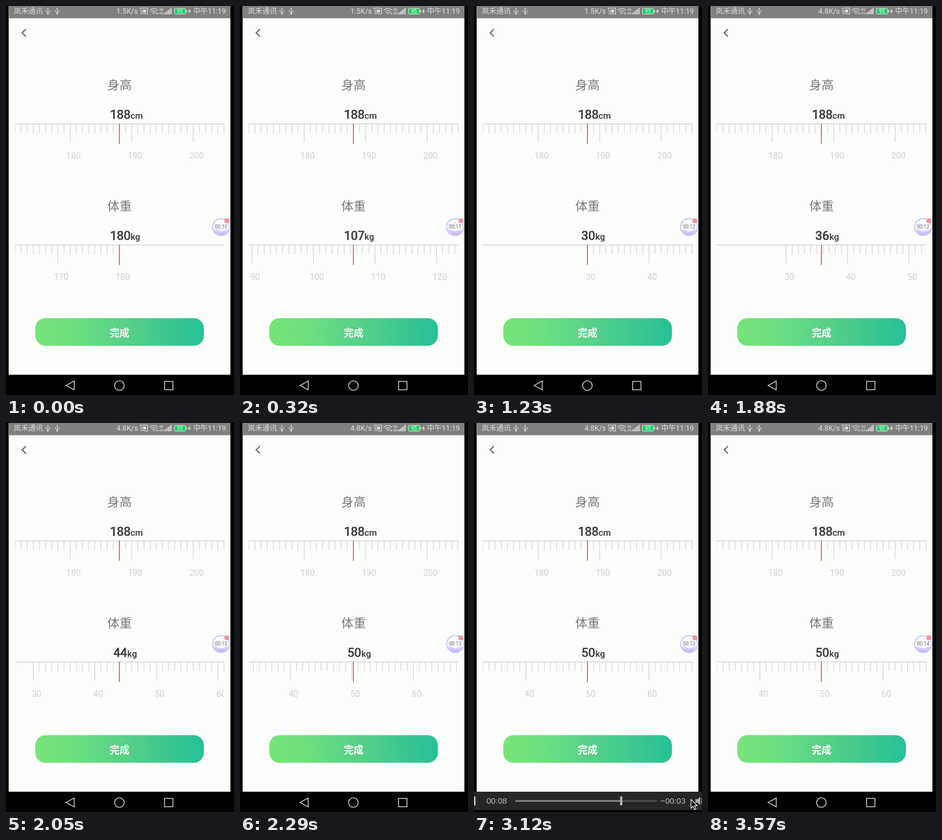
Write an HTML page that moves like this. It is 381 px wide and 652 px high and loops after 4.02 s.

```html
<!DOCTYPE html>
<html lang="zh-CN">
<head>
<meta charset="utf-8">
<title>身高体重</title>
<style>
  html, body { margin: 0; width: 100%; height: 100%; overflow: hidden; background: #000; }
  svg { display: block; width: 381px; height: 652px; }
  text { font-family: Roboto, "Noto Sans CJK SC", "Noto Sans CJK", sans-serif; }
  .mid { text-anchor: middle; }
  .status { font-size: 12.2px; fill: #dedede; }
  .title { font-size: 20.5px; fill: #777; }
  .value { font-size: 20.3px; fill: #383838; stroke: #383838; stroke-width: .7px; }
  .unit { font-size: 15px; font-weight: 500; fill: #383838; }
  .label { font-size: 14.2px; fill: #cfcfcf; }
  .time { font: 13.6px "Liberation Sans", sans-serif; fill: #bcbcbc; }
  .line { fill: none; stroke: #dedede; }
</style>
</head>
<body>
<svg viewBox="0 0 381 652">
  <defs>
    <linearGradient id="green">
      <stop offset="0" stop-color="#77e47a"/>
      <stop offset=".14" stop-color="#73e27c"/>
      <stop offset=".55" stop-color="#54d089"/>
      <stop offset="1" stop-color="#26c097"/>
    </linearGradient>
    <linearGradient id="lilac" x2="0" y2="1">
      <stop offset="0" stop-color="#e9d5f8"/>
      <stop offset="1" stop-color="#b9b0f8"/>
    </linearGradient>
    <clipPath id="scale"><rect x="14.5" y="190" width="350.5" height="290"/></clipPath>
    <clipPath id="disc"><circle cx="359.5" cy="370.5" r="13.5"/></clipPath>
    <g id="usb" class="line">
      <path d="M0 4V14M-3 7V9.5L0 12L3 10V7"/>
      <path d="M-1.5 5L0 3L1.5 5Z" fill="#dedede" stroke="none"/>
      <circle cy="13.3" r="1.2" fill="#dedede" stroke="none"/>
    </g>
  </defs>

  <rect width="381" height="652"/>
  <rect x="4.5" width="370.5" height="618" fill="#fcfefb"/>
  <rect x="4.5" width="370.5" height="20.5" fill="#80807f"/>

  <text class="status" x="13" y="13">岚禾通讯</text>
  <use href="#usb" x="70"/>
  <use href="#usb" x="85.5"/>
  <text class="status" id="speed" x="184.5" y="13"></text>
  <g class="line" stroke-width="1.1">
    <path d="M224.5 6V3.5H236.5V13.5H232M224.5 12A2 2 0 0 1 226.5 14M224.5 9.5A4.5 4.5 0 0 1 229 14M224.5 7.2A6.8 6.8 0 0 1 231.3 14"/>
    <path d="M228 6H234V11H232Z" fill="#dedede" stroke="none"/>
    <path d="M240.3 7Q247 1 253.7 7M242.5 9.6Q247 5.4 251.5 9.6M244.6 12Q247 9.6 249.4 12"/>
    <path d="M247 14V12.5M251.5 14V11M253.5 14V11"/>
  </g>
  <g fill="#dedede" font-size="5.8" font-weight="500">
    <text x="256" y="7.8">3G</text>
    <text x="256" y="13.8">2G</text>
    <path d="M264.5 14V11H266.3V14ZM267.3 14V9H269.1V14ZM270.1 14V7H271.9V14ZM272.7 14V5H274.3V14ZM275.1 14V3H276.7V14Z"/>
  </g>
  <rect x="281.5" y="4" width="18.5" height="9.5" rx="1" fill="#18cf62" stroke="#dedede"/>
  <rect x="300.5" y="6.5" width="1.8" height="4.5" fill="#dedede"/>
  <text class="mid" x="290.8" y="12" font-size="8.5" fill="#fff">95</text>
  <path d="M307.5 4L304 9.5H306.3L305.5 13.5L309 8H306.7Z" fill="#dedede"/>
  <text class="status" x="312.7" y="13">中午11:19</text>

  <path d="M33.3 38.8L27 45L33.3 51.2" fill="none" stroke="#6b6b6b" stroke-width="2"/>

  <text class="title mid" x="189.7" y="140">身高</text>
  <text class="title mid" x="189.7" y="343">体重</text>
  <g id="rulers"></g>

  <rect x="49" y="523.3" width="281.7" height="46.3" rx="17" fill="url(#green)"/>
  <text class="mid" x="189.8" y="554.2" font-size="16.5" font-weight="700" fill="#fff">完成</text>

  <circle cx="359.5" cy="370.5" r="14.2" fill="#fcfcff" stroke="#c3c5f2" stroke-width="1.8"/>
  <path d="M345 376Q350 373 355 376T365 376T375 375V386H345Z" fill="url(#lilac)" clip-path="url(#disc)"/>
  <circle cx="369" cy="360" r="4.3" fill="#f3939f"/>
  <text class="mid" id="clock" x="359.5" y="373" font-size="8.4" fill="#666"></text>

  <g class="line" stroke-width="1.3">
    <path d="M100.3 636L114 628.6V643.4Z"/>
    <circle cx="189.5" cy="636.2" r="8"/>
    <rect x="265" y="629.2" width="14" height="14"/>
  </g>

  <g id="player">
    <rect y="618" width="381" height="31" fill="#272727"/>
    <rect y="649" width="381" height="3"/>
    <rect y="626" width="2.5" height="15" fill="#c4c4c4"/>
    <text class="time" id="past" x="21" y="638"></text>
    <rect x="69" y="632" width="237" height="3" rx="1.5" fill="#4c4c4c"/>
    <rect id="done" x="69" y="632" height="3" rx="1.5" fill="#808080"/>
    <rect id="knob" y="625.5" width="4" height="15.5" rx="1.5" fill="#aeaeae"/>
    <text class="time" id="left" x="311.5" y="638"></text>
    <path d="M370 630.5H373.5L378 626.5V640.5L373.5 636.5H370Z" fill="#a8a8a8"/>
    <path d="M380 629.5Q382 633.5 380 637.5" fill="none" stroke="#a8a8a8" stroke-width="1.4"/>
  </g>
  <path id="cursor" d="M0 0V14.5L3.4 11.3L5.8 16.8L8.2 15.7L5.9 10.4H10.4Z" stroke="#fff" stroke-width="1.1"/>
</svg>
<script>
const LOOP = 4020, CENTER = 189.5, GAP = 10.28;
const $ = id => document.getElementById(id);
const ramp = (t, from, to) => Math.min(1, Math.max(0, (t - from) / (to - from)));
const mix = (a, b, k) => a + (b - a) * k;

function add(parent, tag, attrs, text = '') {
  const el = document.createElementNS('http://www.w3.org/2000/svg', tag);
  for (const key in attrs) el.setAttribute(key, attrs[key]);
  el.textContent = text;
  return parent.appendChild(el);
}

function makeRuler(y, unit, min, max) {
  const root = $('rulers');
  add(root, 'path', { d: `M15 ${y}H365`, stroke: '#cacaca' });
  const clip = add(root, 'g', { 'clip-path': 'url(#scale)' });
  const strip = add(clip, 'g', {});
  const labels = [];
  let minor = '', major = '';
  for (let n = min; n <= max; n++) {
    const x = ((n - min) * GAP).toFixed(2);
    if (n % 10) {
      minor += `M${x} ${y}v15.5`;
    } else {
      major += `M${x} ${y}v30.5`;
      const el = add(strip, 'text', { class: 'label mid', x: +x + 5.5, y: y + 58.5 }, n);
      labels.push({ n, el });
    }
  }
  add(strip, 'path', { d: minor, stroke: '#d0d0d0' });
  add(strip, 'path', { d: major, stroke: '#cbcbcb' });
  add(root, 'path', { d: `M${CENTER} ${y - .5}v34`, stroke: '#d9453f', 'stroke-width': 1.4 });
  const value = add(root, 'text', { class: 'value mid', x: 191, y: y - 8.5 });
  const mark = add(root, 'text', { class: 'unit', y: y - 8.5 }, unit);

  return v => {
    const shown = String(Math.round(v));
    strip.setAttribute('transform', `translate(${CENTER - (v - min) * GAP} 0)`);
    // A label shows only while its tick is on the scale.
    for (const { n, el } of labels) {
      el.setAttribute('visibility', Math.abs(n - v) < 17.1 ? 'visible' : 'hidden');
    }
    value.textContent = shown;
    mark.setAttribute('x', shown.length > 2 ? 208 : 202.8);
  };
}

// Swipes slow down towards their end and redraw in a few even steps.
const swipes = [
  { start: 60, end: 540, steps: 8, to: 82, power: 2 },
  { start: 652, end: 940, steps: 5, to: 30, power: 1 },
  { start: 1820, end: 2290, steps: 8, to: 50.25, power: 2.5 },
  { start: 2290, end: 2400, steps: 1, to: 50, power: 1 }
];

function weight(t) {
  let v = 180;
  for (const { start, end, steps, to, power } of swipes) {
    const k = Math.floor(ramp(t, start, end) * steps) / steps;
    v = mix(v, to, 1 - (1 - k) ** power);
  }
  return v;
}

const setHeight = makeRuler(197.5, 'cm', 150, 220);
const setWeight = makeRuler(400.5, 'kg', 30, 180);
setHeight(188);

function draw(t) {
  setWeight(weight(t));
  $('speed').textContent = t < 1640 ? '1.5K/s' : '4.8K/s';
  $('clock').textContent = '00:' + (10 + Math.floor((t + 700) / 960));

  const knob = 246 + (t - 3120) * .021;
  const late = t >= 2770;
  $('player').setAttribute('opacity', ramp(t, 2460, 2760) - ramp(t, 3180, 3540));
  $('knob').setAttribute('x', knob - 2);
  $('done').setAttribute('width', Math.max(0, knob - 69));
  $('past').textContent = late ? '00:08' : '00:07';
  $('left').textContent = late ? '−00:03' : '−00:04';

  const enter = 1 - (1 - ramp(t, 2400, 2700)) ** 2;
  const leave = ramp(t, 3120, 3300);
  const x = mix(382, 362.5, enter) + 20 * leave;
  const y = mix(560, 631, enter) + 20 * leave;
  $('cursor').setAttribute('transform', `translate(${x} ${y})`);
}

const start = performance.now();
function frame() {
  draw((performance.now() - start) % LOOP);
  requestAnimationFrame(frame);
}
frame();
</script>
</body>
</html>
```
